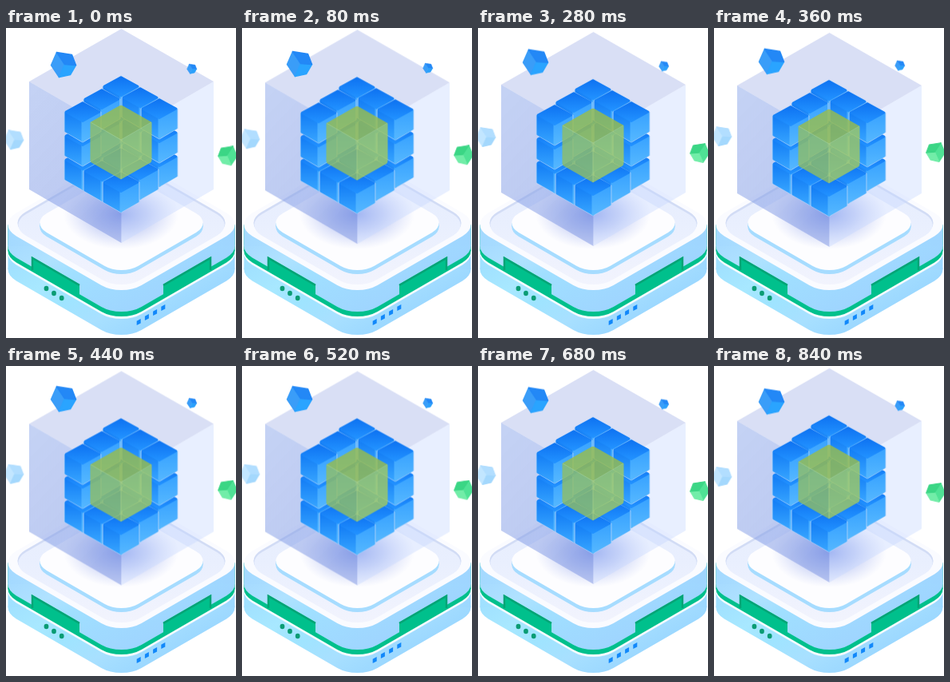
An HTML page that plays this animation: 288x388 px, repeating every 0.88 s.

```html
<!DOCTYPE html>
<html lang="en">
<head>
<meta charset="utf-8">
<title>Floating cubes</title>
<style>
  html, body { margin: 0; width: 100%; height: 100%; overflow: hidden; background: #fff; }
  svg { display: block; width: 288px; height: 388px; }
  .bob { animation: bob 880ms infinite; }
  .down { --d: 1px; }
  .up { --d: -.88px; }
  /* one step every 40 ms */
  @keyframes bob {
    0% { transform: translateY(0); animation-timing-function: steps(2); }
    9.0909% { transform: translateY(calc(var(--d) * 1.2)); animation-timing-function: steps(3); }
    22.7273% { transform: translateY(calc(var(--d) * 2.9)); animation-timing-function: steps(4); }
    40.9091% { transform: translateY(calc(var(--d) * 4.9)); animation-timing-function: steps(3); }
    54.5455% { transform: translateY(calc(var(--d) * 5.7)); animation-timing-function: steps(2); }
    63.6364% { transform: translateY(calc(var(--d) * 5.2)); animation-timing-function: steps(3); }
    77.2727% { transform: translateY(calc(var(--d) * 3.9)); animation-timing-function: steps(4); }
    95.4545% { transform: translateY(calc(var(--d) * 1.8)); animation-timing-function: steps(1); }
    100% { transform: translateY(0); }
  }
  .a { fill: var(--a); stroke: var(--a); }
  .b { fill: var(--b); stroke: var(--b); }
  .c { fill: var(--c); stroke: var(--c); }
  #gem path { stroke-width: 1.5; stroke-linejoin: round; }
  #block path { stroke-width: 3; stroke-linejoin: round; }
</style>
</head>
<body>
<svg viewBox="0 0 288 388">
  <defs>
    <linearGradient id="body">
      <stop stop-color="#9fe0ff"/><stop offset=".3" stop-color="#a8e8ff"/>
      <stop offset=".5" stop-color="#9fe4ff"/><stop offset=".75" stop-color="#a8e0ff"/>
      <stop offset="1" stop-color="#9cd8ff"/>
    </linearGradient>
    <linearGradient id="rim">
      <stop stop-color="#a4d9ff"/><stop offset=".3" stop-color="#b0e2ff"/>
      <stop offset=".5" stop-color="#a0dfff"/><stop offset="1" stop-color="#9fd5ff"/>
    </linearGradient>
    <linearGradient id="recess" x2="1" y2="1">
      <stop stop-color="#e5ecfd"/><stop offset=".5" stop-color="#e9effe"/><stop offset="1" stop-color="#f3f4fd"/>
    </linearGradient>
    <radialGradient id="shade">
      <stop stop-color="#6c86e4" stop-opacity=".75"/>
      <stop offset=".45" stop-color="#7f96e8" stop-opacity=".45"/>
      <stop offset="1" stop-color="#a0b0f0" stop-opacity="0"/>
    </radialGradient>
    <linearGradient id="wallL" x2=".6" y2="1">
      <stop stop-color="#8aa6ea" stop-opacity=".5"/><stop offset="1" stop-color="#8299e4" stop-opacity=".55"/>
    </linearGradient>
    <linearGradient id="top" x2="0" y2="1">
      <stop stop-color="#0f74f2"/><stop offset="1" stop-color="#2191ff"/>
    </linearGradient>
    <linearGradient id="left" x2="0" y2="1">
      <stop stop-color="#137df5"/><stop offset="1" stop-color="#36a4ff"/>
    </linearGradient>
    <linearGradient id="right" x2="0" y2="1">
      <stop stop-color="#38a2ff"/><stop offset="1" stop-color="#54b7ff"/>
    </linearGradient>

    <g id="block">
      <path d="M0 -.5L23.4 13V37.8L0 51.4L-23.4 37.8V13Z" fill="#a9d0fa"/>
      <path d="M-21 14L0 25.7V49L-21 37Z" fill="url(#left)" stroke="url(#left)"/>
      <path d="M21 14L0 25.7V49L21 37Z" fill="url(#right)" stroke="url(#right)"/>
      <path d="M0 1.8L20.8 13L0 24.4L-20.8 13Z" fill="url(#top)" stroke="url(#top)"/>
    </g>
    <g id="gem">
      <path class="b" d="M-8 -15L2 0L-5 16L-15 1Z"/>
      <path class="c" d="M2 0L16 1L9 13L-5 16Z"/>
      <path class="a" d="M-8 -15L11 -12L16 1L2 0Z"/>
    </g>
  </defs>

  <g id="base"></g>

  <g fill="#00c08c">
    <path d="M32 286L92 320.6V338L32 303.4Z"/>
    <path d="M257 286L197 320.6V338L257 303.4Z"/>
  </g>
  <path d="M33 303V288L92 322M256 303V288L197 322" fill="none" stroke="#06a476" stroke-width="2.5"/>
  <g fill="#0a9c74">
    <ellipse cx="50.5" cy="326" rx="2.9" ry="3.3"/>
    <ellipse cx="60" cy="332" rx="2.9" ry="3.3"/>
    <ellipse cx="69.7" cy="338" rx="2.9" ry="3.3"/>
  </g>
  <g id="leds" fill="#1288fa"></g>

  <ellipse cx="144" cy="233" rx="72" ry="44" fill="url(#shade)"/>

  <g class="bob down">
    <path d="M144.5 1L260 67L144.5 134L29 67Z" fill="#a0afe6" fill-opacity=".4"/>
    <path d="M29 67L144.5 134V269L29 202Z" fill="url(#wallL)"/>
    <path d="M260 67L144.5 134V269L260 202Z" fill="#c3d4ff" fill-opacity=".38"/>
    <g id="stack"></g>
    <g fill-opacity=".8">
      <path d="M105.5 118L144 140V189.5L107 168.5Q105.5 167.5 105.5 165Z" fill="#90be64"/>
      <path d="M182.5 118L144 140V189.5L181 168.5Q182.5 167.5 182.5 165Z" fill="#a2cb62"/>
      <path d="M105.5 118L142 97.2Q144 96.2 146 97.2L182.5 118L144 140Z" fill="#99bd4a"/>
    </g>
    <path d="M106 118L144 140L182 118M144 140V189" fill="none" stroke="#a6d08a" stroke-opacity=".7"/>
  </g>

  <g class="bob up">
    <use href="#gem" transform="translate(71.5 45.5)" style="--a:#2388f6;--b:#3a9df8;--c:#2aa4ff"/>
    <use href="#gem" transform="translate(232.5 51) scale(.39)" style="--a:#2388f6;--b:#3a9df8;--c:#2aa0fb"/>
    <use href="#gem" transform="translate(9.5 139.5) scale(.76)" style="--a:#b2deff;--b:#c2e6ff;--c:#a4d8fd"/>
    <use href="#gem" transform="translate(278 159.5) scale(-.76 .76)" style="--a:#3bd685;--b:#4fe295;--c:#72eda8"/>
  </g>
</svg>
<script>
  const add = (id, markup) => { document.getElementById(id).innerHTML = markup; };

  // Rounded square laid flat in isometric view.
  const tile = (y, side, r, fill) =>
    `<rect x="${-side / 2}" y="${-side / 2}" width="${side}" height="${side}" rx="${r}" fill="${fill}"
      transform="matrix(.866 .5 -.866 .5 144.5 ${y})"/>`;

  // Tile extruded downwards by h.
  const slab = (y, h, side, r, fill) => {
    const w = (side * Math.SQRT1_2 - r * (Math.SQRT2 - 1)) * 1.2247;
    return tile(y + h, side, r, fill) +
      `<rect x="${144.5 - w}" y="${y}" width="${2 * w}" height="${h}" fill="${fill}"/>`;
  };

  const layers = [[56, 'url(#body)'], [36, '#f6fbff'], [33, '#00c08c'], [27, 'url(#rim)']];
  add('base',
    layers.map(([h, fill]) => slab(246, h, 181, 29, fill)).join('') +
    tile(246, 181, 29, '#fafbff') +
    tile(244, 166, 27, '#d2dcf5') +
    tile(246.5, 165, 27, 'url(#recess)') +
    slab(244, 5, 132, 24, '#a6dcff') +
    tile(244, 132, 24, '#fdfdff'));

  add('leds', [0, 1, 2, 3].map(i => {
    const x = 163.7 + i * 10.2, y = 366.7 - i * 6;
    return `<path d="M${x} ${y}l5 -2.6v5.4l-5 2.6z"/>`;
  }).join(''));

  // 3 x 3 x 3 blocks with the front upper 2 x 2 x 2 corner left open.
  let blocks = '';
  for (let k = 2; k >= 0; k--)
    for (let i = 0; i < 3; i++)
      for (let j = 0; j < 3; j++)
        if (!(i && j && k < 2))
          blocks += `<use href="#block" x="${144 + (i - j) * 24}" y="${60 + i * 14 + j * 16 + k * 30}"/>`;
  add('stack', blocks);
</script>
</body>
</html>
```
